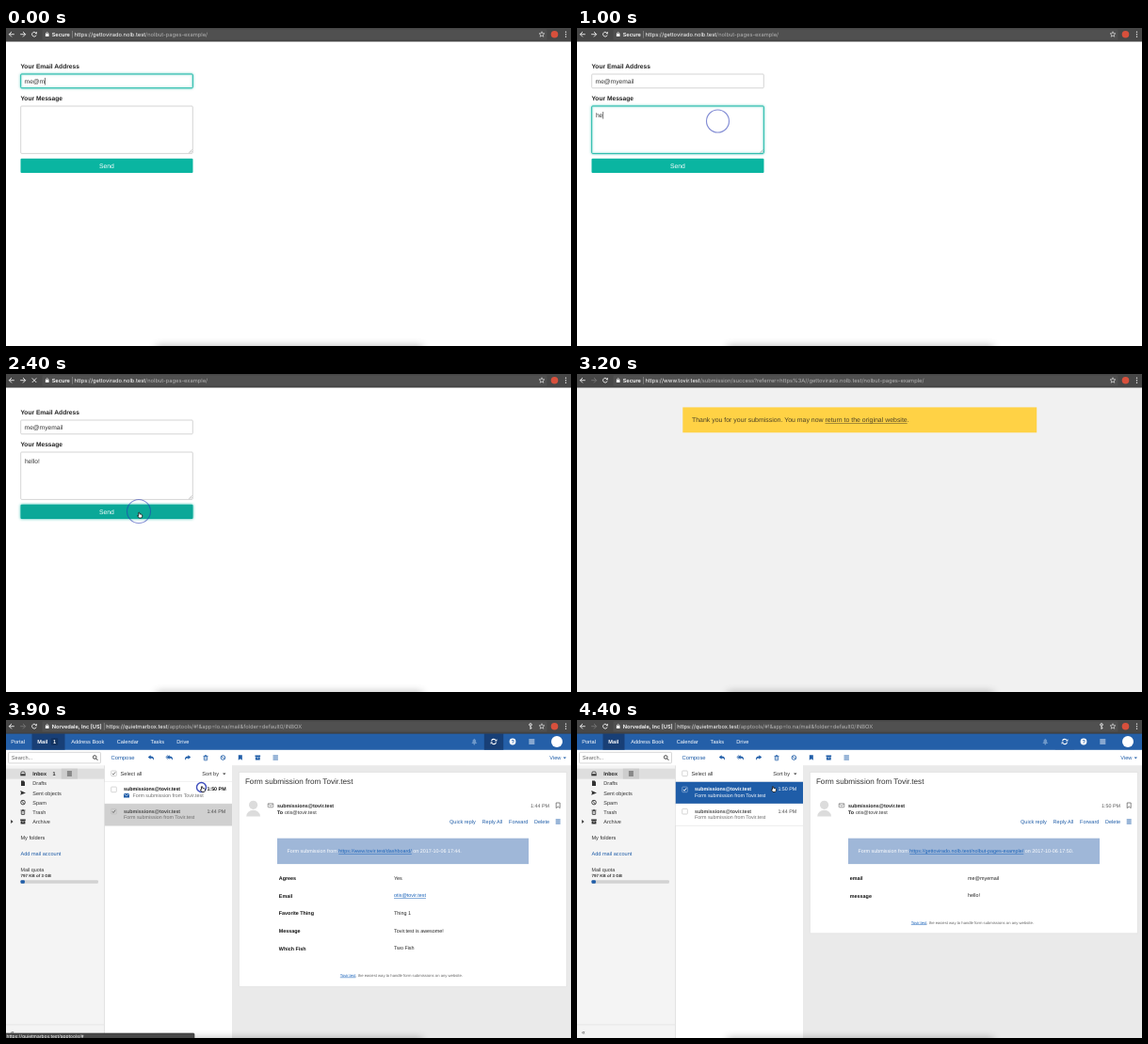
Animation, 600 px wide and 338 px high, one loop 5600 ms. Source, as an HTML page with a canvas:

```html
<!DOCTYPE html>
<html lang="en">
<head>
<meta charset="utf-8">
<title>Form submission</title>
<style>
html, body { margin: 0; width: 100%; height: 100%; overflow: hidden; background: #fff; }
canvas { display: block; width: 600px; height: 338px; }
</style>
</head>
<body>
<canvas id="stage"></canvas>
<script>
const LOOP = 5600, STEP = 100;
const SANS = '"Liberation Sans", Arial, sans-serif';
const UI = 'Inter, sans-serif';
const BLUE = '#1f5da8', TEAL = '#0ab5a1', INK = '#333';
const SITE = 'Tovir.test', SENDER = 'submissions@tovir.test', SUBJECT = 'Form submission from ' + SITE;
const FORM_HOST = 'https://gettovirado.nolb.test', FORM_PATH = '/nolbut-pages-example/';
const MAIL_HOST = 'https://quietmarbox.test';

const canvas = document.getElementById('stage');
const ctx = canvas.getContext('2d');
const dpr = window.devicePixelRatio || 1;
canvas.width = 600 * dpr;
canvas.height = 338 * dpr;

// ---------- helpers ----------
function text(s, x, y, size, color = INK, weight = 400, font = SANS) {
  ctx.font = `${weight} ${size}px ${font}`;
  ctx.fillStyle = color;
  ctx.fillText(s, x, y);
  return x + ctx.measureText(s).width;
}

function link(s, x, y, size, color) {
  const end = text(s, x, y, size, color);
  rect(x, y + 0.8, end - x, 0.5, color);
  return end;
}

function rect(x, y, w, h, color) {
  ctx.fillStyle = color;
  ctx.fillRect(x, y, w, h);
}

function box(x, y, w, h, r, fill, stroke, width = 0.7) {
  ctx.beginPath();
  ctx.roundRect(x, y, w, h, r);
  if (fill) { ctx.fillStyle = fill; ctx.fill(); }
  if (stroke) { ctx.strokeStyle = stroke; ctx.lineWidth = width; ctx.stroke(); }
}

function disc(x, y, r, color) {
  ctx.beginPath();
  ctx.arc(x, y, r, 0, Math.PI * 2);
  ctx.fillStyle = color;
  ctx.fill();
}

function ring(x, y, r, color, width = 0.9) {
  ctx.beginPath();
  ctx.arc(x, y, r, 0, Math.PI * 2);
  ctx.strokeStyle = color;
  ctx.lineWidth = width;
  ctx.stroke();
}

function trace(points, dx, dy) {
  ctx.beginPath();
  for (let i = 0; i < points.length; i += 2) ctx.lineTo(dx + points[i], dy + points[i + 1]);
}

function line(points, x, y, color, width = 0.9) {
  trace(points, x, y);
  ctx.strokeStyle = color;
  ctx.lineWidth = width;
  ctx.stroke();
}

function poly(points, x, y, color) {
  trace(points, x, y);
  ctx.closePath();
  ctx.fillStyle = color;
  ctx.fill();
}

const caretDown = (x, y, color) => poly([-1.7, -0.8, 1.7, -0.8, 0, 1.1], x, y, color);

function glow(color, blur, draw) {
  ctx.save();
  ctx.shadowColor = color;
  ctx.shadowBlur = blur * dpr;
  draw();
  ctx.restore();
}

// ---------- icons ----------
function arrow(x, y, dir, color) {
  line([-2.8 * dir, 0, 2.6 * dir, 0], x, y, color, 0.9);
  line([0, -2.7, 2.7 * dir, 0, 0, 2.7], x, y, color, 0.9);
}

function reload(x, y, color) {
  ctx.beginPath();
  ctx.arc(x, y, 2.4, 0.4, 5.4);
  ctx.strokeStyle = color;
  ctx.lineWidth = 0.9;
  ctx.stroke();
  poly([0.3, -0.5, 2.8, -0.5, 2.8, -3], x, y, color);
}

function sync(x, y, color) {
  ctx.strokeStyle = color;
  ctx.lineWidth = 1.1;
  for (const a of [0, Math.PI]) {
    ctx.save();
    ctx.translate(x, y);
    ctx.rotate(a);
    ctx.beginPath();
    ctx.arc(0, 0, 2.6, 3.4, 5.7);
    ctx.stroke();
    poly([1, -0.4, 3.4, -0.4, 3.4, -2.8], 0, 0, color);
    ctx.restore();
  }
}

function lock(x, y) {
  rect(x - 1.8, y - 0.5, 3.6, 2.9, '#fff');
  ctx.beginPath();
  ctx.arc(x, y - 0.7, 1.2, Math.PI, 0);
  ctx.strokeStyle = '#fff';
  ctx.lineWidth = 0.7;
  ctx.stroke();
}

function star(x, y) {
  const pts = [];
  for (let i = 0; i < 11; i++) {
    const r = i % 2 ? 1.3 : 3, a = i * Math.PI / 5 - Math.PI / 2;
    pts.push(r * Math.cos(a), r * Math.sin(a));
  }
  line(pts, x, y, '#ddd', 0.7);
}

function bars(x, y, color, w = 5.4) {
  for (const d of [-2, 0, 2]) rect(x - w / 2, y + d - 0.45, w, 0.9, color);
}

function replyIcon(x, y, dir, double) {
  poly([-3.2, -0.7, -0.4, -3, -0.4, -1.6, 2, -1.2, 3, 0.6, 2.6, 2.6, 1.6, 0.6, -0.4, 0.2, -0.4, 1.6]
    .map((v, i) => i % 2 ? v : v * dir), x, y, BLUE);
  if (double) line([-1.9, -2.8, -4.2, -0.7, -1.9, 1.4], x, y, BLUE, 0.8);
}

function trash(x, y, color) {
  box(x - 1.7, y - 1.4, 3.4, 4, 0.4, null, color, 0.8);
  rect(x - 2.5, y - 2.3, 5, 0.8, color);
  rect(x - 0.8, y - 3, 1.6, 0.8, color);
  rect(x - 0.3, y - 0.6, 0.6, 2.4, color);
}

function ban(x, y, color) {
  ring(x, y, 2.3, color);
  line([-1.6, -1.6, 1.6, 1.6], x, y, color);
}

const BOOKMARK = [-2, -2.8, 2, -2.8, 2, 2.8, 0, 1.2, -2, 2.8, -2, -2.8];

function archive(x, y, color) {
  rect(x - 2.8, y - 2.5, 5.6, 1.5, color);
  rect(x - 2.4, y - 0.7, 4.8, 3.2, color);
  rect(x - 0.9, y - 0.1, 1.8, 0.6, '#fff');
}

function inbox(x, y) {
  line([-2.4, 0.4, -1.6, -2, 1.6, -2, 2.4, 0.4], x, y, INK, 0.8);
  rect(x - 2.7, y + 0.3, 5.4, 2, INK);
}

function envelope(x, y, color) {
  box(x - 2.8, y - 2, 5.6, 4, 0.4, null, color, 0.7);
  line([-2.8, -1.8, 0, 0.5, 2.8, -1.8], x, y, color, 0.7);
}

function checkbox(x, y, on, stroke = '#bbb', fill = '#fff', tick = '#666') {
  box(x, y, 5.6, 5.6, 0.8, fill, stroke, 0.6);
  if (on) line([1.2, 2.8, 2.4, 4.2, 4.5, 1.3], x, y, tick, 0.9);
}

function hand(x, y) {
  trace([-1.6, -2.6, -0.7, -2.9, -0.1, -1, 1.6, -0.8, 2.5, 0, 2.3, 1.8, 1.5, 3, -1, 3, -2.7, 0.6, -1.4, 0.4], x, y);
  ctx.closePath();
  ctx.fillStyle = '#fff';
  ctx.strokeStyle = '#111';
  ctx.lineWidth = 0.8;
  ctx.lineJoin = 'round';
  ctx.fill();
  ctx.stroke();
}

function pointer(x, y) {
  trace([0, 0, 0, 6.4, 1.5, 5, 2.6, 7.2, 3.5, 6.7, 2.6, 4.7, 4.5, 4.6], x - 1, y - 3);
  ctx.closePath();
  ctx.fillStyle = '#111';
  ctx.strokeStyle = '#fff';
  ctx.lineWidth = 0.6;
  ctx.stroke();
  ctx.fill();
}

// Expanding, fading circle left by a mouse click.
function ripple(t, start, x, y) {
  const age = t - start;
  if (age < 0 || age > 330) return;
  ctx.globalAlpha = 1 - age / 440;
  ring(x, y, 2.5 + age * 0.05, '#2537b4', 1.5 - age / 500);
  ctx.globalAlpha = 1;
}

// ---------- browser ----------
function browser({ secure, host, path, loading, forward, key }) {
  rect(0, 0, 600, 14.3, '#474747');
  box(38.5, 1.5, 536, 11, 1.2, '#505050');
  rect(0, 13.7, 600, 0.6, '#383838');
  arrow(6, 6.7, -1, '#f2f2f2');
  arrow(18, 6.7, 1, forward ? '#f2f2f2' : '#777');
  if (loading) {
    line([-2.3, -2.3, 2.3, 2.3], 30, 6.7, '#f2f2f2');
    line([2.3, -2.3, -2.3, 2.3], 30, 6.7, '#f2f2f2');
  } else reload(30, 6.7, '#f2f2f2');
  lock(43.7, 6.6);
  let x = text(secure, 48.7, 8.9, 5.65, '#fff', 600, UI) + 2.2;
  rect(x, 3, 0.6, 7.6, '#999');
  x = text(host, x + 2.4, 8.9, 5.75, '#fff', 400, UI);
  text(path, x, 8.9, 5.75, '#b4b4b4', 400, UI);
  if (key) {
    ring(557, 5, 1.3, '#eee');
    rect(556.5, 6.3, 1, 3.6, '#eee');
    rect(557, 8.2, 1.5, 0.8, '#eee');
  }
  star(569, 6.8);
  disc(582.5, 6.7, 3.8, '#d8503c');
  for (const d of [-2.5, 0, 2.5]) disc(594.5, 6.7 + d, 0.7, '#eee');
}

function dockShadow() {
  glow('rgba(0,0,0,.3)', 9, () => rect(160, 338, 282, 8, '#999'));
}

// ---------- contact form ----------
function field(x, y, w, h, focused) {
  if (focused) glow('rgba(10,181,161,.6)', 2.5, () => box(x, y, w, h, 1, '#fff', '#22b9a8', 1));
  else box(x, y, w, h, 1, '#fff', '#c9c9c9', 0.8);
}

function typed(s, x, y, caret) {
  const end = text(s, x, y, 6.67);
  if (caret) rect(end + 0.2, y - 6, 0.6, 7.6, '#222');
}

function formPage(t) {
  rect(0, 0, 600, 338, '#fff');
  const emailChars = t < 100 ? 4 : t < 300 ? 5 : Math.min(10, 6 + Math.floor((t - 300) / STEP));
  const msgChars = Math.max(0, Math.min(6, Math.floor((t - 800) / STEP)));
  const inEmail = t < 800, inMessage = !inEmail && t < 2200, sent = t >= 2200;

  text('Your Email Address', 15.4, 42.8, 6.67, '#222', 700);
  field(15.7, 49, 182.6, 14.8, inEmail);
  typed('me@myemail'.slice(0, emailChars), 19.6, 58.9, inEmail);

  text('Your Message', 15.4, 76.6, 6.67, '#222', 700);
  field(15.7, 83, 182.6, 50.4, inMessage);
  typed('hello!'.slice(0, msgChars), 19.9, 95, inMessage && t < 1600);
  line([0, -3.4, -3.4, 0], 197.6, 132.7, '#888', 0.5);
  line([0, -1.6, -1.6, 0], 197.6, 132.7, '#888', 0.5);

  const button = () => box(15.5, 138.8, 183, 15.2, 1, t >= 1700 ? '#0ba898' : TEAL);
  sent ? glow('rgba(10,181,161,.9)', 3, button) : button();
  text('Send', 98.9, 149, 6.8, '#fff');
  dockShadow();

  browser({ secure: 'Secure', host: FORM_HOST, path: FORM_PATH, forward: true, loading: sent });
  ripple(t, 810, 149.5, 99);
  ripple(t, 2200, 141, 146);
  if (t >= 1700) hand(142.3, 150);
  else if (t >= 1600) pointer(145, 121);
}

// ---------- thank-you page ----------
function thanksPage(t) {
  rect(0, 0, 600, 338, '#f1f1f1');
  rect(112.3, 35.4, 375.9, 26.9, '#ffd245');
  let x = text('Thank you for your submission. You may now ', 122, 51.3, 6.95, '#4a4025');
  x = link('return to the original website', x, 51.3, 6.95, '#4a4025');
  text('.', x, 51.3, 6.95, '#4a4025');
  dockShadow();
  browser({
    secure: 'Secure', host: 'https://www.tovir.test',
    path: '/submission/success?referrer=https%3A//gettovirado.nolb.test' + FORM_PATH
  });
  if (t < 3000) pointer(142.3, 150);
  else if (t < 3200) {
    const k = (t - 2900) / 300;
    pointer(142.3 + 132 * k, 150 - 96 * k);
  }
}

// ---------- mail client ----------
function navBar(unread, busy) {
  rect(0, 14.3, 600, 17.3, '#245fa8');
  const shift = unread ? 12 : 0;
  rect(27.5, 14.3, 23 + shift, 17.3, '#183f76');
  const tab = (s, x, w) => text(s, x, 25, 5.65, '#fff', w);
  tab('Portal', 5.2);
  tab('Mail', 33.3, 700);
  if (unread) {
    box(47.8, 19.3, 7.4, 7.4, 1, '#12325f');
    tab('1', 50, 700);
  }
  tab('Address Book', 57.2 + shift);
  tab('Calendar', 105.8 + shift);
  tab('Tasks', 141.6 + shift);
  tab('Drive', 169.2 + shift);

  poly([-3, 2, -1.9, 0.7, -1.7, -1.6, 0, -3.2, 1.7, -1.6, 1.9, 0.7, 3, 2], 497.3, 23, '#6d97c9');
  disc(497.3, 25.6, 0.9, '#6d97c9');
  if (busy) rect(507.8, 14.3, 20.4, 17.3, '#183f76');
  sync(518, 23, '#fff');
  disc(538, 23, 3.4, '#fff');
  text('?', 536.6, 25.1, 5.6, '#245fa8', 700);
  bars(558.3, 23, '#fff', 6);
  disc(585, 23, 6, '#fff');
}

function toolbar() {
  rect(0, 31.6, 600, 16.6, '#fff');
  box(2.5, 34.3, 98, 11.6, 1, '#fff', '#c4c4c4', 0.7);
  text('Search...', 5.8, 42.1, 5.6, '#666');
  ring(94.2, 39.5, 1.8, INK);
  line([1.4, 1.4, 3.1, 3.3], 94.2, 39.5, INK, 1);
  text('Compose', 111.4, 42, 5.9, BLUE);
  replyIcon(154, 40.2, 1);
  replyIcon(174, 40.2, 1, true);
  replyIcon(193, 40.2, -1);
  trash(212, 40.2, BLUE);
  ban(230.4, 40, BLUE);
  poly(BOOKMARK, 248.8, 40, BLUE);
  archive(267.3, 40, BLUE);
  bars(286.2, 40, BLUE);
  text('View', 577.3, 42, 5.65, BLUE);
  caretDown(593.3, 40.2, BLUE);
}

function sidebar(unread) {
  rect(0, 48.2, 104.5, 290, '#f4f4f4');
  rect(0, 51.6, 104.5, 11, '#dedede');
  const menuX = unread ? 67.4 : 57.4;
  rect(menuX - 8.6, 51.6, 17.2, 11, '#cdcdcd');
  bars(menuX, 57, INK, 5);
  inbox(18, 57);
  const bold = text('Inbox', 28.3, 59.1, 5.5, '#222', 700);
  if (unread) text('1', bold + 6.5, 59.1, 5.5, '#222', 700);

  ['Drafts', 'Sent objects', 'Spam', 'Trash', 'Archive'].forEach((s, i) =>
    text(s, 28.3, 69.3 + i * 10.2, 5.55));
  poly([-2, -2.7, 0.8, -2.7, 2, -1.4, 2, 2.7, -2, 2.7], 18, 67.3, INK);
  poly([-2.8, 2.4, 3, 0, -2.8, -2.4, -2, 0], 18, 77.4, INK);
  ban(18, 87.6, INK);
  trash(18, 97.9, INK);
  archive(18, 108, INK);
  poly([-1, -1.9, 1.4, 0, -1, 1.9], 6.2, 108, INK);

  text('My folders', 15.4, 127.2, 5.65);
  text('Add mail account', 15.4, 143.8, 5.6, BLUE);
  text('Mail quota', 15.4, 161, 5.4);
  text('797 KB of 3 GB', 15.4, 167.3, 4.5, INK, 700);
  box(15.5, 170.2, 82.4, 3.6, 1, '#d2d2d2');
  box(15.5, 170.2, 4.4, 3.6, 1, BLUE);
  rect(0, 323.6, 104.5, 0.6, '#ddd');
  text('«', 5, 333.8, 6.5, '#444');
  rect(104.2, 48.2, 0.6, 290, '#d4d4d4');
}

function mailRow(y, time, selected, { unread = false, fill = '#fff' } = {}) {
  const blue = selected && fill === BLUE;
  rect(104.8, y, 135.2, 23.3, fill);
  rect(104.8, y + 23, 135.2, 0.5, '#ddd');
  checkbox(111.7, y + 5.3, selected, blue ? '#9db9dc' : '#bbb',
    blue ? BLUE : selected ? '#cfcfcf' : '#fff', blue ? '#fff' : '#666');
  const main = blue ? '#fff' : unread ? '#111' : '#4a4a4a';
  const sub = blue ? '#fff' : '#6c6c6c';
  text(SENDER, 125, y + 9.5, 5.35, main, 700);
  text(time, 213.4, y + 9.5, 5.35, main, unread ? 700 : 400);
  if (unread) {
    rect(125, y + 12.3, 6, 4.4, BLUE);
    line([0, 0.3, 3, 2.5, 6, 0.3], 125, y + 12.3, '#fff', 0.6);
  }
  text(SUBJECT, unread ? 134.4 : 125, y + 16.2, 5.35, sub);
}

function mailList(opened) {
  rect(104.8, 48.2, 135.2, 290, '#fff');
  checkbox(111.7, 54, !opened, '#bbb', '#fff', '#777');
  text('Select all', 121.6, 59, 5.6);
  text('Sort by', 208.3, 59, 5.6);
  caretDown(231.8, 57.2, INK);
  rect(104.8, 65.4, 135.2, 0.5, '#ddd');
  mailRow(65.8, '1:50 PM', opened, opened ? { fill: BLUE } : { unread: true });
  mailRow(89.1, '1:44 PM', !opened, { fill: opened ? '#fff' : '#d0d0d0' });
}

function detail(fresh) {
  rect(240, 48.2, 360, 290, '#eaeaea');
  box(247.4, 55.4, 348, fresh ? 171.4 : 228, 0.5, '#fff', '#dadada', 0.6);
  text(SUBJECT, 253.9, 68.4, 8.15);

  ctx.save();
  ctx.beginPath();
  ctx.rect(254, 85, 17, 18);
  ctx.clip();
  disc(262.6, 90.3, 4.6, '#dcdcdc');
  ctx.beginPath();
  ctx.ellipse(262.6, 102.4, 7.4, 6.6, 0, Math.PI, 0);
  ctx.fill();
  ctx.restore();

  envelope(281, 90.8, '#777');
  text(SENDER, 288, 92.8, 5.35, '#222', 700);
  text('To', 288, 99.8, 5.35, '#222', 700);
  text('otis@tovir.test', 296, 99.8, 5.35);
  text(fresh ? '1:50 PM' : '1:44 PM', 557, 92.8, 5.35, '#555');
  line(BOOKMARK, 586.2, 90.8, '#555', 0.7);
  const actions = [['Quick reply', 471], ['Reply All', 505.6], ['Forward', 534], ['Delete', 561]];
  for (const [s, x] of actions) text(s, x, 109.9, 5.55, BLUE);
  bars(586.2, 108, BLUE, 5);

  rect(288, 125.7, 267, 27.4, '#9fb7d8');
  let x = text('Form submission from ', 298.4, 141.3, 5.4, '#fff');
  x = link(fresh ? FORM_HOST + FORM_PATH : 'https://www.tovir.test/dashboard/', x, 141.3, 5.4, '#1660b8');
  text(` on 2017-10-06 17:${fresh ? 50 : 44}.`, x, 141.3, 5.4, '#fff');

  const rows = fresh
    ? [['email', 'me@myemail'], ['message', 'hello!']]
    : [['Agrees', 'Yes'], ['Email', 'otis@tovir.test'], ['Favorite Thing', 'Thing 1'],
       ['Message', SITE + ' is awesome!'], ['Which Fish', 'Two Fish']];
  const valueX = fresh ? 415 : 412;
  rows.forEach(([name, value], i) => {
    const y = 170 + i * 18.65;
    text(name, 289.8, y, 5.4, '#111', 700);
    if (name === 'Email') link(value, valueX, y - 0.2, 5.4, '#1660b8');
    else text(value, valueX, y - 0.2, 5.4, '#222');
  });
  const footY = fresh ? 216.7 : 272.8;
  x = link(SITE, 354.8, footY, 4.2, '#1660b8');
  text(', the easiest way to handle form submissions on any website.', x, footY, 4.2, '#666');
}

function mailPage(t) {
  const opened = t >= 4000, fresh = t >= 4200, unread = t < 4300;
  sidebar(unread);
  mailList(opened);
  detail(fresh);
  toolbar();
  navBar(unread, t < 4400);
  dockShadow();
  if (t >= 3700 && t < 4100) {
    box(-2, 333, 202, 8, 1, '#484848', '#2e2e2e', 0.6);
    text(MAIL_HOST + '/apptools/#', 0.5, 338, 4.9, '#fff', 400, UI);
  }
  browser({
    secure: 'Norvedale, Inc [US]', host: MAIL_HOST,
    path: '/apptools/#!&app=lo.na/mail&folder=default0/INBOX', key: t < 4400 || true
  });
  ripple(t, 3850, 207.5, 71.5);
  const k = Math.min(1, (t - 3400) / 300);
  if (k < 1) pointer(275 - 66 * k, 54 + 19.5 * k);
  else hand(209, 73.5);
}

// ---------- playback ----------
function draw(now) {
  const t = Math.floor((now % LOOP) / STEP) * STEP;
  ctx.setTransform(dpr, 0, 0, dpr, 0, 0);
  ctx.textRendering = 'geometricPrecision';
  (t < 2600 ? formPage : t < 3400 ? thanksPage : mailPage)(t);
}

const start = performance.now();
function tick() {
  draw(performance.now() - start);
  requestAnimationFrame(tick);
}
tick();
</script>
</body>
</html>
```
